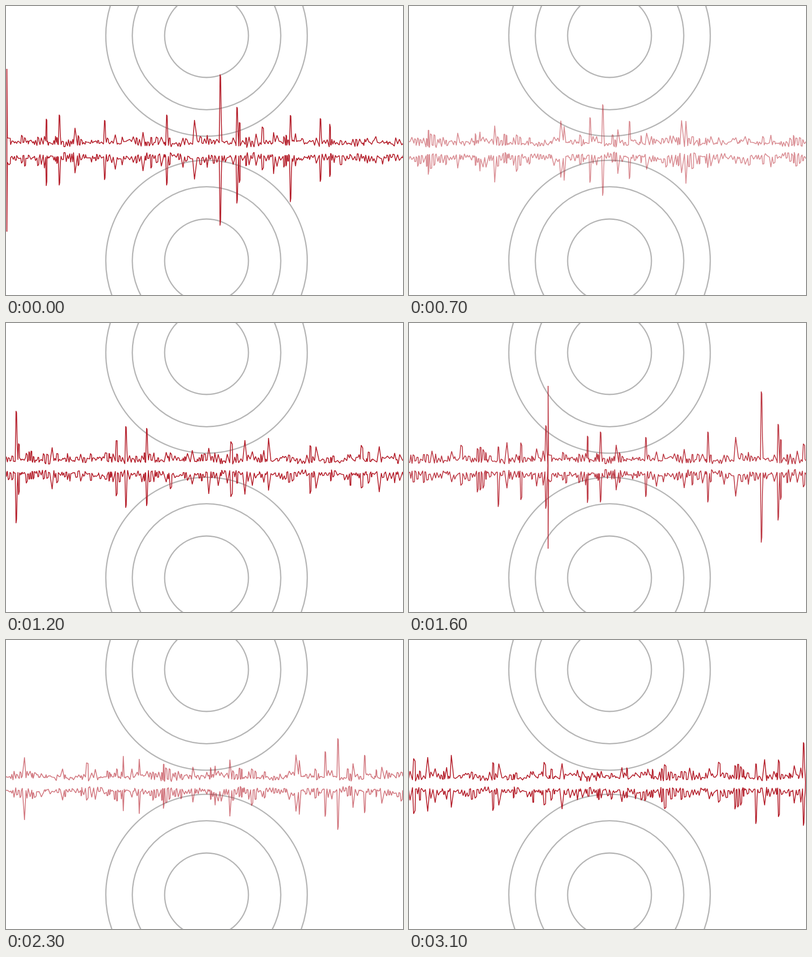
An HTML page with a canvas that plays this animation: 876x639 px, repeating every 3.2 s.

```html
<!DOCTYPE html>
<html lang="en">
<head>
<meta charset="utf-8">
<title>Waveform</title>
<style>
  html, body { margin: 0; width: 100%; height: 100%; overflow: hidden; background: #fff; }
  canvas { display: block; }
</style>
</head>
<body>
<canvas id="stage" width="876" height="639"></canvas>
<script>
const ctx = document.getElementById('stage').getContext('2d');
const WIDTH = 876, HEIGHT = 639, MID = 318.5;
const LOOP = 3200, STEP = 100;
const SPEED = 2.636, STRIP = 4522.5;

// The tallest peaks: [x, height above, height below if different]
const peaks = [
  [118, 78], [218, 66], [355, 78], [473, 167], [510, 95, 118], [628, 77, 115],
  [694, 70], [1244, 55, 107], [2245, 72], [2273, 101], [2332, 64],
  [2956, 101, 144], [3102, 91], [3186, 124], [3428, 90], [3474, 86],
  [4415, 45, 88], [4520, 92]
];

// [phase of the strip's pass, opacity]
const fades = [[0, 1], [.07, 1], [.41, .5], [.52, .63], [.7, 1], [.81, 1], [.93, .86], [1, 1]];

function seeded(seed) {
  return () => {
    seed = (seed + 0x6D2B79F5) | 0;
    let r = Math.imul(seed ^ (seed >>> 15), 1 | seed);
    r = (r + Math.imul(r ^ (r >>> 7), 61 | r)) ^ r;
    return ((r ^ (r >>> 14)) >>> 0) / 4294967296;
  };
}

function buildWave() {
  const rand = seeded(41);
  const between = (a, b) => a + (b - a) * rand();
  const upper = [[2, 179.5], [3, 27]];
  const lower = [[2, 180.5], [3, 27]];
  const add = (x, up, down = up) => {
    upper.push([x, up]);
    lower.push([x, down]);
  };
  // Valleys sink towards the middle in slow, irregular swells
  const rest = x => {
    const swell = 2.5 * Math.sin(x / 31) + 2 * Math.sin(x / 12.7);
    add(x, between(9, 19) + swell, between(8, 17) + swell);
  };

  let x = 4;
  const bump = limit => {
    const end = Math.min(x + between(3.5, 10), limit);
    const w = end - x;
    const tall = rand() < .11 ? between(14, 38) : 0;
    const height = between(15, 37) + tall;
    const up = height * between(.75, 1.05), down = height * between(.75, 1.2);
    if (rand() < .5) {
      add(x + w * .25, up, down);
      add(x + w * .6, up * between(.85, 1), down * between(.85, 1));
      rest(x + w * .68);
    } else {
      add(x + w * between(.3, .6), up, down);
    }
    rest(end);
    x = end;
  };

  for (const [px, up, down = up] of peaks) {
    while (px - 3 - x > 3) bump(px - 3);
    rest(px - 2.5);
    add(px - .7, up, down);
    add(px + .6, up * .97, down * .93);
    add(px + 2, up * .4, down * .35);
    rest(px + 3.5);
    x = px + 3.5;
  }
  add(STRIP + 1.5, 4, -4);

  const path = new Path2D();
  const trace = (points, sign) => points.forEach(([px, h], i) =>
    path[i ? 'lineTo' : 'moveTo'](px, MID + sign * h));
  trace(upper, -1);
  trace(lower, 1);
  path.moveTo(2, MID - 179.5);
  path.lineTo(2, MID + 180.5);
  return path;
}

function opacityAt(phase) {
  const i = fades.findIndex(([p]) => p > phase);
  const [p0, a0] = fades[i - 1], [p1, a1] = fades[i];
  return a0 + (a1 - a0) * (phase - p0) / (p1 - p0);
}

const wave = buildWave();

function drawRings() {
  ctx.strokeStyle = '#b6b6b6';
  ctx.lineWidth = 2.8;
  for (const cy of [65.5, 563.5]) {
    for (const r of [92.5, 163.8, 222.3]) {
      ctx.beginPath();
      ctx.arc(442.5, cy, r, 0, Math.PI * 2);
      ctx.stroke();
    }
  }
}

function drawWave(time) {
  const offset = time * SPEED % STRIP;
  ctx.strokeStyle = '#b5212d';
  ctx.lineWidth = 1.9;
  ctx.lineJoin = 'bevel';
  ctx.globalAlpha = opacityAt(offset / STRIP);
  // The next pass joins once its first peak is fully on stage
  for (let left = -offset; left < WIDTH - 4; left += STRIP) {
    ctx.save();
    ctx.translate(left, 0);
    ctx.stroke(wave);
    ctx.restore();
  }
  ctx.globalAlpha = 1;
}

function frame() {
  const time = Math.floor(performance.now() % LOOP / STEP) * STEP;
  ctx.fillStyle = '#fff';
  ctx.fillRect(0, 0, WIDTH, HEIGHT);
  drawRings();
  drawWave(time);
  requestAnimationFrame(frame);
}
frame();
</script>
</body>
</html>
```
